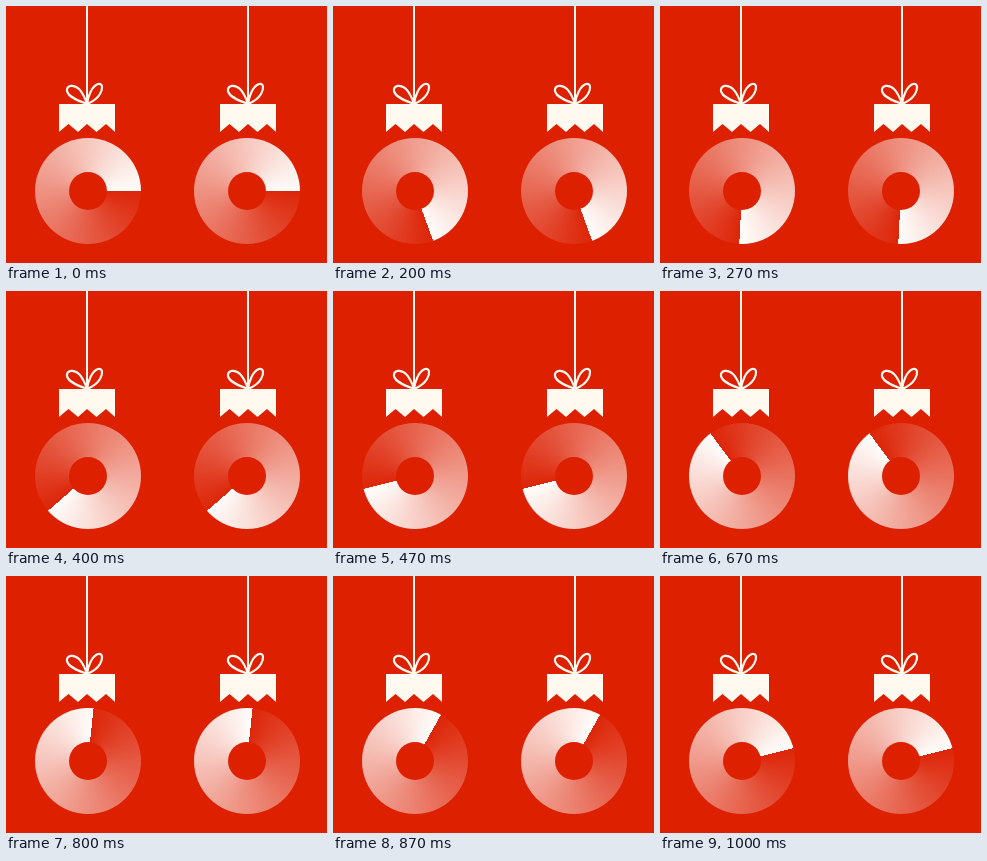
An HTML page that plays this animation: 321 by 257 pixels, repeating every 1070 ms.

```html
<!DOCTYPE html>
<html lang="en">
<head>
<meta charset="utf-8">
<title>Baubles</title>
<style>
  html, body { margin: 0; width: 100%; height: 100%; overflow: hidden; background: #dc2000; }
  svg { position: absolute; left: 0; top: 0; }
  .ring {
    position: absolute; top: 132px; width: 106px; height: 106px; border-radius: 50%;
    background: conic-gradient(from calc(var(--edge) + 90deg), #dd2609, #fffdfb);
  }
</style>
</head>
<body>
<div class="ring" style="left:29px"></div>
<div class="ring" style="left:188px"></div>
<svg width="321" height="257" viewBox="0 0 321 257">
  <defs>
    <g id="hanger">
      <path d="M81 0V98" fill="none" stroke="#fff9f0" stroke-width="2"/>
      <g fill="none" stroke="#fff9f0" stroke-width="2.2" stroke-linejoin="round">
        <path d="M81 98C73 95 62 91 61 85C60 79 68 78 73 83C77 87 79 92 81 98Z"/>
        <path d="M81 98C82 90 86 80 92 78C97 77 97 83 94 88C91 93 86 96 81 98Z"/>
      </g>
      <path d="M53 98H109V126L100 118L90.500 126L81 118L72 126L62.500 118L53 126Z" fill="#fff9f0"/>
    </g>
  </defs>
  <use href="#hanger"/>
  <use href="#hanger" x="161"/>
  <g fill="#dc2000">
    <circle cx="82" cy="185" r="19"/>
    <circle cx="241" cy="185" r="19"/>
  </g>
</svg>
<script>
  const LOOP = 1070, STEPS = 16;
  // [step, edge angle in degrees clockwise from the right]
  const KEYS = [[0, 0], [3, 70], [6, 139], [7, 166], [10, 233.5], [12, 276], [15, 346]];

  const stepStart = i => Math.round(i * 20 / 3) * 10;

  function stepAt(time) {
    let step = STEPS - 1;
    while (stepStart(step) > time) step--;
    return step;
  }

  function edgeAngle(step) {
    const next = Math.max(1, KEYS.findIndex(([at]) => at >= step));
    const [s0, a0] = KEYS[next - 1], [s1, a1] = KEYS[next];
    return a0 + (a1 - a0) * (step - s0) / (s1 - s0);
  }

  function draw(time) {
    const angle = edgeAngle(stepAt(time % LOOP));
    document.body.style.setProperty('--edge', angle + 'deg');
  }

  const start = performance.now();
  function tick() {
    draw(performance.now() - start);
    requestAnimationFrame(tick);
  }
  tick();
</script>
</body>
</html>
```
